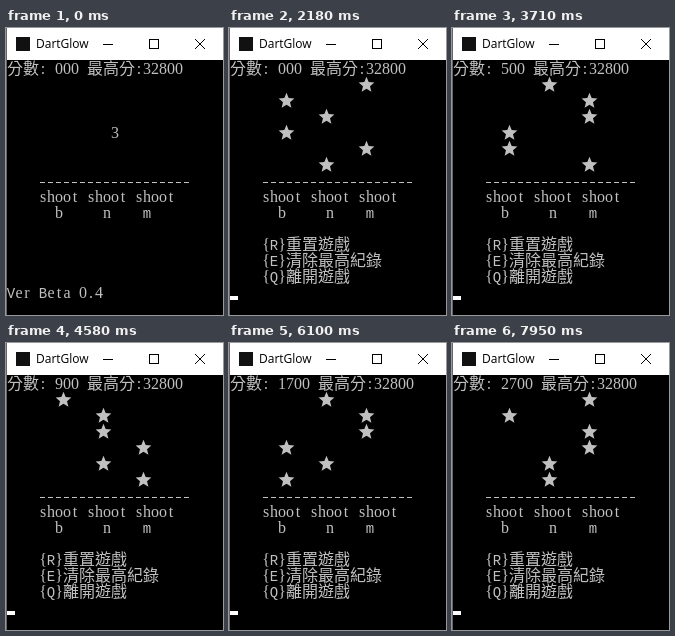
These frames come from a looping animation (217 by 287 pixels, 8 s). An HTML page with a canvas:

```html
<!DOCTYPE html>
<html lang="zh-Hant">
<head>
<meta charset="utf-8">
<title>DartGlow</title>
<style>
  html, body { margin: 0; width: 100%; height: 100%; overflow: hidden; background: #000; }
  canvas { display: block; width: 217px; height: 287px; }
</style>
</head>
<body>
<canvas id="stage" width="217" height="287"></canvas>
<script>
const ctx = document.getElementById("stage").getContext("2d");
const LOOP = 8000;
const INK = "#c0c0c0";
const LEFT = 1, TOP = 33, CELL = 8, LINE = 16;

// Lanes from the bottom star upwards; every hit drops the pile one line.
const LANES = "nmbnbmbbmmnmnnbnbbnbmmnbbbnnnmmbm";
const LANE_COL = { b: 6, n: 11, m: 16 };
const HITS = [2710, 2980, 3250, 3380, 3710, 4040, 4250, 4380, 4580,
  4780, 4910, 5040, 5310, 5510, 5770, 5900, 6100, 6230, 6370, 6570, 6770,
  7030, 7160, 7360, 7490, 7620, 7950];
const START = 2180;
const REDRAW = [2710, 2780];

const SERIF_FONT = "16px 'Liberation Serif', serif";
const MONO_FONT = "14px 'Liberation Mono', monospace";
const CJK_FONT = "300 16px 'Noto Sans CJK TC', 'Noto Sans CJK', sans-serif";

const colX = col => LEFT + col * CELL;
const rowY = row => TOP + row * LINE;

function rect(x, y, w, h, color) {
  ctx.fillStyle = color;
  ctx.fillRect(x, y, w, h);
}

// Serif letters too broad for one cell fall back to the monospace face.
function fontFor(ch) {
  if (ch > "\u2fff") return CJK_FONT;
  return /[A-Zm]/.test(ch) ? MONO_FONT : SERIF_FONT;
}

function print(text, col, row) {
  ctx.textAlign = "center";
  ctx.fillStyle = INK;
  for (const ch of text) {
    const span = ch > "\u2fff" ? 2 : 1;
    ctx.font = fontFor(ch);
    ctx.fillText(ch, colX(col + span / 2), rowY(row) + 13);
    col += span;
  }
}

function star(col, row) {
  const cx = colX(col) + 8.5, cy = rowY(row) + 8;
  ctx.beginPath();
  for (let i = 0; i < 10; i++) {
    const r = i % 2 ? 3.7 : 8.3;
    const a = (i * Math.PI) / 5;
    ctx.lineTo(cx + r * Math.sin(a), cy - r * Math.cos(a));
  }
  ctx.fillStyle = INK;
  ctx.fill();
}

function cursor(row) {
  rect(LEFT, rowY(row) + 11, CELL, 4, "#fff");
}

function titleBar() {
  rect(0, 0, 217, 32, "#fff");
  rect(0, 0, 1, 287, "#666");
  rect(10, 9, 14, 14, "#111");
  ctx.textAlign = "left";
  ctx.fillStyle = "#000";
  ctx.font = "12px 'Open Sans', 'Noto Sans', sans-serif";
  ctx.fillText("DartGlow", 30, 20);

  rect(97, 16, 10, 1, "#000");
  ctx.strokeStyle = "#000";
  ctx.lineWidth = 1;
  ctx.strokeRect(143.5, 11.5, 9, 9);
  ctx.beginPath();
  ctx.moveTo(189, 11);
  ctx.lineTo(199, 21);
  ctx.moveTo(199, 11);
  ctx.lineTo(189, 21);
  ctx.stroke();
}

function keys() {
  for (let i = 0; i < 19; i++) rect(colX(4 + i) + 1, rowY(7) + 9, 5, 1, INK);
  print("shoot shoot shoot", 4, 8);
  print("b", 6, 9);
  print("n", 12, 9);
  print("m", 17, 9);
}

function countdown(t) {
  keys();
  print(t < 130 ? "3" : t < 990 ? "2" : "1", 13, 4);
  print("Ver Beta 0.4", 0, 14);
  if ((t >= 130 && t < 990) || t >= 1120) cursor(15);
}

function game(hits) {
  for (let i = 0; i < 6; i++) star(LANE_COL[LANES[hits + i]], 6 - i);
  keys();
  print("{R}重置遊戲", 4, 11);
  print("{E}清除最高紀錄", 4, 12);
  print("{Q}離開遊戲", 4, 13);
  cursor(14);
}

function draw(t) {
  const hits = HITS.filter(h => h <= t).length;
  rect(0, 0, 217, 287, "#000");
  titleBar();
  print(`分數: ${String(hits * 100).padStart(3, "0")} 最高分:32800`, 0, 0);
  if (t < START) countdown(t);
  else if (t < REDRAW[0] || t >= REDRAW[1]) game(hits);
}

const begin = performance.now();
function tick() {
  draw((performance.now() - begin) % LOOP);
  requestAnimationFrame(tick);
}
tick();
</script>
</body>
</html>
```
